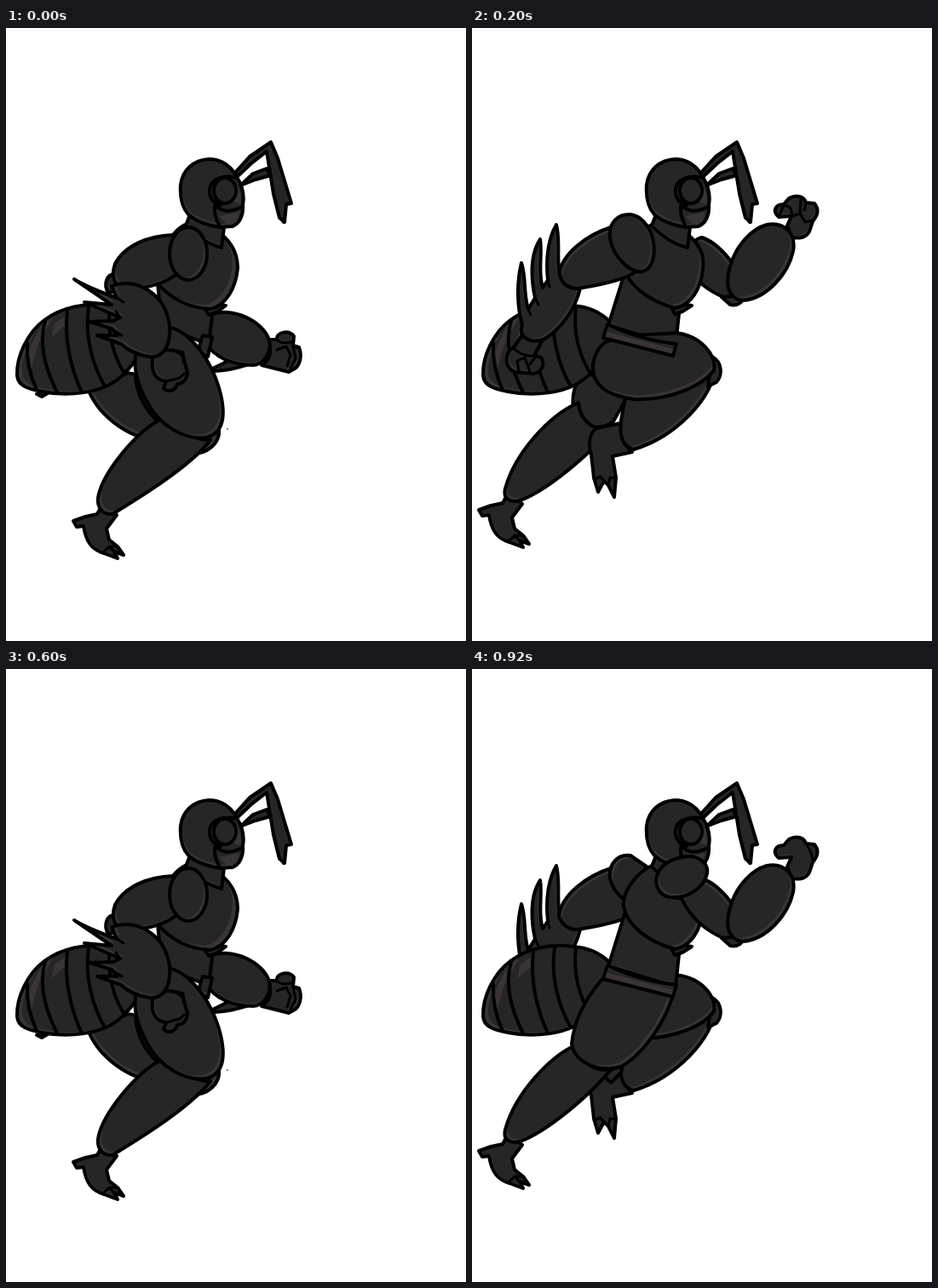
Write an HTML page that moves like this. It is 540x720 px and loops after 1 s.

```html
<!DOCTYPE html>
<html lang="en">
<head>
<meta charset="utf-8">
<title>Insect runner</title>
<style>
html, body { margin: 0; width: 100%; height: 100%; overflow: hidden; background: #fff; }
svg { display: block; width: 100%; height: 100%; }
.rim { fill: #3a3434; }
.base { fill: #262626; }
.ink { fill: none; stroke: #000; stroke-width: 4; stroke-linejoin: round; stroke-linecap: round; }
.thin { stroke-width: 3; }
</style>
</head>
<body>
<svg id="stage" viewBox="0 0 540 720"></svg>
<script>
let clips = 0;

// A closed shape whose lighter rim is left bare by a shifted dark copy.
function part(d, dx = 0, dy = 0) {
  const id = 'clip' + clips++;
  return `<clipPath id="${id}"><path d="${d}"/></clipPath>
    <path class="rim" d="${d}"/>
    <g clip-path="url(#${id})"><path class="base" d="${d}" transform="translate(${dx} ${dy})"/></g>
    <path class="ink" d="${d}"/>`;
}
const line = (d, kind = '') => `<path class="ink ${kind}" d="${d}"/>`;
const patch = d => `<path class="rim" d="${d}"/>`;
const move = (x, y, art) => `<g transform="translate(${x} ${y})">${art}</g>`;
const oval = (x, y, rx, ry) =>
  `M${x - rx} ${y}a${rx} ${ry} 0 1 1 ${2 * rx} 0a${rx} ${ry} 0 1 1 ${-2 * rx} 0Z`;

// Shared body
const antennae = () =>
  part('M275 185L290 171L306 165L312 176L327 210L326 228L320 217L311 173L293 178Z', 1, -1) +
  part('M267 172L286 151L311 134L319 153L335 206L329 207L327 228L321 223L314 195L306 145L288 159L271 175Z', -2, 0);

const head = () => antennae() +
  part('M214 219C206 210 204 197 205 184C207 167 220 155 238 154C253 154 264 162 271 175C278 186 280 197 278 208C279 219 275 229 266 233L252 234C238 232 224 228 214 219Z', 2, -4) +
  patch('M250 221L274 216L271 227L260 231Z') +
  patch('M267 178C275 189 277 199 275 207L267 204Z') +
  line('M271 176C262 173 248 174 241 183C236 193 240 205 252 208') +
  line(oval(257, 191, 13, 15)) +
  line('M246 206C243 215 246 224 251 233M246 208C252 215 262 217 275 211');

const abdomen = () =>
  part('M162 345C150 333 135 327 118 326C94 322 65 328 45 343C25 358 12 386 13 408C14 420 25 424 42 427C66 432 95 430 115 422C132 415 142 404 152 390L164 370Z', 6, -3) +
  patch('M24 384L42 348L55 340L38 370L29 403Z') +
  patch('M57 347L74 335L70 349L53 364Z') +
  line('M25 370C24 390 28 408 36 425M46 344C38 370 46 400 60 428M72 332C68 365 76 400 89 428M97 328C92 360 101 395 116 421M122 328C118 358 127 388 140 407');

const neck = () =>
  part('M216 219L211 232C223 245 238 254 253 258L256 234Z', 1, -3);

const torso = () =>
  part('M180 285L160 349L239 373L244 326Z', 0, -3) +
  part('M234 328L246 324L258 326L247 333L238 336Z', -3, 0) +
  part('M213 230C194 238 176 261 178 279C182 301 206 320 238 329C257 326 269 306 271 283C273 267 267 254 255 244Z', -4, -4) +
  neck();

const belt = () => part('M159 348L154 364L236 385L240 371C212 368 184 360 159 348Z', 5, -7);

// Feet
const trailFoot = () =>
  part('M43 545L36 558L22 561L8 566L12 573L20 572C23 591 30 600 44 604L60 610L56 602L67 606L60 596L50 588L47 575L59 559Z', 2, -2) +
  line('M43 603L50 596L56 602M50 596L59 596', 'thin');
const raisedFoot = () =>
  part('M175 464L147 470C138 474 136 489 140 501L143 528L148 545L155 532L160 537L167 551L169 528L165 503L188 498C179 490 174 480 175 464Z', 2, -2) +
  line('M143 530L151 527L155 533M160 537L162 528L169 529', 'thin');

// Arms used by both wide strides
const rearUpper = () =>
  part('M163 234C135 243 105 265 102 290C106 303 118 308 130 305C160 300 183 294 192 286Z', 3, 4);
const rearGauntlet = () =>
  part('M103 290C99 270 104 250 99 231C90 246 86 270 89 296L83 305C77 286 83 266 80 248C68 266 69 294 74 317L66 330C60 312 64 293 58 276C52 300 53 328 59 349C54 362 66 371 84 366C104 354 121 331 127 306C115 307 106 302 103 290Z', -3, -3) +
  line('M89 296L91 304M74 317L78 325M66 330L69 337', 'thin');
const frontUpper = () =>
  part('M236 268C251 262 262 246 270 246C290 253 309 276 318 300C322 315 315 322 303 319C282 312 260 298 246 270Z', -3, 4);
const frontLower = () =>
  part('M293 316L303 325C313 327 319 321 319 314Z', -3, -2) +
  part('M370 232L375 221L360 222C352 215 356 207 366 207L372 200C381 195 390 198 392 205L402 206C408 213 405 221 400 227L396 239C391 248 382 247 375 246Z', -2, -3) +
  part('M346 231C365 227 381 240 377 262C371 290 345 318 318 320C300 318 297 300 303 280C310 255 328 236 346 231Z', -4, -4);

const trailShin = () =>
  part('M125 440C90 455 50 500 39 541C36 553 45 558 56 555C87 544 140 500 163 470C146 473 127 465 125 440Z', 3, -4);
const raisedShin = () =>
  part('M285 398C285 432 240 480 190 495C175 492 172 475 176 455L181 428Z', -4, -3);
const raisedKnee = () => part('M282 386C293 392 295 407 287 416L277 421Z', -3, 0);

function crouch() {
  return part('M36 430L54 426L42 433Z') +
    part('M236 403L263 390L292 393C276 398 258 404 236 403Z', 0, -2) +
    part('M308 366L318 366C317 357 332 354 338 362L337 373L344 375C348 385 345 396 339 400L332 404L300 396C309 391 313 382 308 366Z', -3, -3) +
    line('M318 367C324 371 332 370 337 368M318 378L329 374L334 384L330 397M337 374L340 388L334 400', 'thin') +
    part('M240 337C265 326 303 345 309 367C312 381 302 396 290 396C268 396 245 388 235 370Z', 0, -3) +
    part('M97 426C110 407 140 400 160 410L182 460L171 482C148 482 111 459 97 426Z', 3, -4) +
    abdomen() +
    part('M129 289C118 288 114 301 120 311L134 309Z', 2, 0) +
    part('M178 300L183 350L238 372L243 330Z', 0, 3) +
    part('M231 361L242 363L237 386L225 380Z', 3, -3) +
    part('M234 331L247 324L258 326L247 334L238 337Z', -3, 0) +
    part('M213 230C195 236 176 270 177 299C195 320 218 329 240 330C259 326 270 304 272 282C272 266 265 253 255 244Z', -6, -5) +
    neck() +
    part('M196 243C168 244 139 255 128 277C122 295 129 305 141 306C167 307 190 298 202 288Z', 3, -4) +
    part(oval(214, 265, 22, 31), -4, -3) +
    part('M250 470C252 488 235 503 214 499L211 490L235 479Z', -5, -2) +
    move(71, 13, trailFoot()) +
    part('M186 457C202 473 220 484 240 484C216 516 151 555 125 571C112 572 107 562 108 552C112 525 151 474 186 457Z', 4, -4) +
    line('M152 408C153 430 164 449 178 462') +
    part('M180 352C208 345 241 386 252 430C258 456 255 476 235 481C210 484 181 468 166 440C153 416 149 395 153 380Z', -4, -4) +
    part('M172 388C178 376 200 375 208 386L213 405C212 414 207 418 201 418C199 427 190 428 185 423L188 415C177 414 170 406 172 388Z', 3, -2) +
    line('M188 415L204 411L209 406M200 379L208 381L208 392', 'thin') +
    part('M124 303C153 292 187 312 192 349C194 374 184 388 168 386C151 383 142 378 135 371L107 361L131 361L124 353L98 345L126 344L134 340L92 322L124 325L80 295C94 304 111 310 130 317Z', 4, -3) +
    line('M130 317L138 322M134 340L129 333M124 353L136 361', 'thin') +
    '<circle cx="260" cy="471" r="0.8"/>';
}

function strideNear() {
  return frontUpper() + frontLower() +
    line('M360 222L366 208L374 211L376 221L385 218L386 202M385 218L391 228L400 226M392 205L390 214', 'thin') +
    trailFoot() +
    part('M130 402C118 422 114 444 124 459C135 471 155 471 166 462L184 430Z', 3, -3) +
    trailShin() +
    raisedFoot() + raisedShin() +
    abdomen() + torso() +
    raisedKnee() +
    part('M155 370C180 357 215 361 240 358C270 362 287 385 284 402C270 421 230 438 190 436C160 432 140 420 142 395C144 382 149 375 155 370Z', -3, -5) +
    belt() +
    rearUpper() +
    part('M186 219C171 218 160 229 162 246C165 268 185 288 200 286C214 282 217 261 210 240C204 228 196 220 186 219Z', -4, -2) +
    part('M62 357L49 375C38 381 37 398 50 404L72 406C83 404 86 394 81 387L73 385L83 366Z', 3, -3) +
    line('M48 375C55 383 65 386 73 385M55 403L53 391L62 387L68 404M68 395L74 387', 'thin') +
    rearGauntlet();
}

function reach() {
  return part('M138 280C140 263 136 246 146 227C134 241 127 260 123 281L117 285C115 269 118 254 122 238C108 253 103 275 104 297L96 304C92 290 94 278 96 265C85 282 82 306 80 329L130 342C146 336 156 325 158 308C150 305 140 297 138 280Z', 3, 3) +
    part('M190 244C162 250 140 264 138 282C142 297 155 306 172 312L188 300Z', 3, 3) +
    move(7, 0, raisedFoot()) +
    part('M298 414C285 451 250 490 200 496C182 495 180 480 184 462L202 430Z', -4, -3) +
    part('M296 388C306 399 306 417 291 427Z', -4, 0) +
    part('M236 372C273 363 297 385 300 405C290 425 250 437 208 436L200 400Z', -3, -4) +
    abdomen() + torso() +
    move(6, 21, trailFoot()) +
    part('M150 484L163 475L177 462L172 480L158 490Z', 2, 0) +
    part('M112 450C80 480 50 530 41 565C43 577 55 578 65 573C96 555 131 515 153 484C135 485 114 474 112 450Z', 4, -3) +
    part('M154 364L226 381C222 410 205 455 170 478C150 486 115 482 109 458C110 425 130 385 154 364Z', -4, -4) +
    belt() +
    part('M232 356L244 368L258 361Z', 0, -2) +
    part('M197 281C195 315 215 350 240 361C253 363 260 340 268 315L252 280Z', 3, -3) +
    part('M190 262C189 250 210 243 225 243C245 243 256 252 255 265C250 280 235 288 215 287C200 285 190 275 190 262Z', 2, -4) +
    part('M331 297L338 290L360 290L369 294L370 302C378 303 381 312 377 318L368 321L362 330C352 335 341 333 333 328Z', -2, -3) +
    line('M360 291C367 300 370 311 367 321M369 304L367 318', 'thin') +
    part('M243 345C245 325 270 308 300 302C325 302 338 315 334 330C331 340 325 346 319 350C320 365 313 378 305 385C308 374 309 365 306 356L291 359C290 373 281 384 270 390C277 378 278 368 274 359L264 358C263 372 252 382 239 386C248 378 252 370 251 361C246 357 243 352 243 345Z', -2, -4) +
    line('M306 356L312 348M274 359L281 350M251 361L259 352', 'thin');
}

function strideFar() {
  return rearGauntlet() + rearUpper() +
    part('M186 219C171 217 160 229 162 246C165 258 172 266 180 272L205 232Z', 4, 3) +
    raisedFoot() + raisedShin() + raisedKnee() +
    part('M238 359C270 362 287 385 284 402C270 422 235 432 205 434L200 400Z', -3, -4) +
    abdomen() + torso() +
    trailFoot() +
    part('M155 478L170 466L179 456L175 474L163 486Z', 2, 0) +
    trailShin() +
    part('M153 364L236 383C228 410 205 450 175 467C150 475 120 462 117 440C120 410 135 385 153 364Z', -4, -4) +
    belt() +
    frontUpper() + frontLower() +
    line('M392 205C397 212 400 219 400 227', 'thin');
}

const nearShoulder = () =>
  part('M247 221C265 217 278 228 276 240C272 258 252 270 232 268C219 266 212 251 219 238C225 228 236 223 247 221Z', 3, -4);

const poses = [
  crouch() + head(),
  strideNear() + head(),
  reach() + head(),
  strideFar() + head() + nearShoulder()
];
const order = [0, 1, 2, 0, 3];
const hold = 200;

const stage = document.getElementById('stage');
stage.innerHTML = poses.map(art => `<g class="pose">${art}</g>`).join('');
const groups = [...stage.querySelectorAll('.pose')];

function draw(ms) {
  const current = order[Math.floor(ms / hold) % order.length];
  groups.forEach((g, i) => g.setAttribute('visibility', i === current ? 'visible' : 'hidden'));
}

draw(0);
const start = performance.now();
function tick() {
  draw(performance.now() - start);
  requestAnimationFrame(tick);
}
requestAnimationFrame(tick);
</script>
</body>
</html>
```
